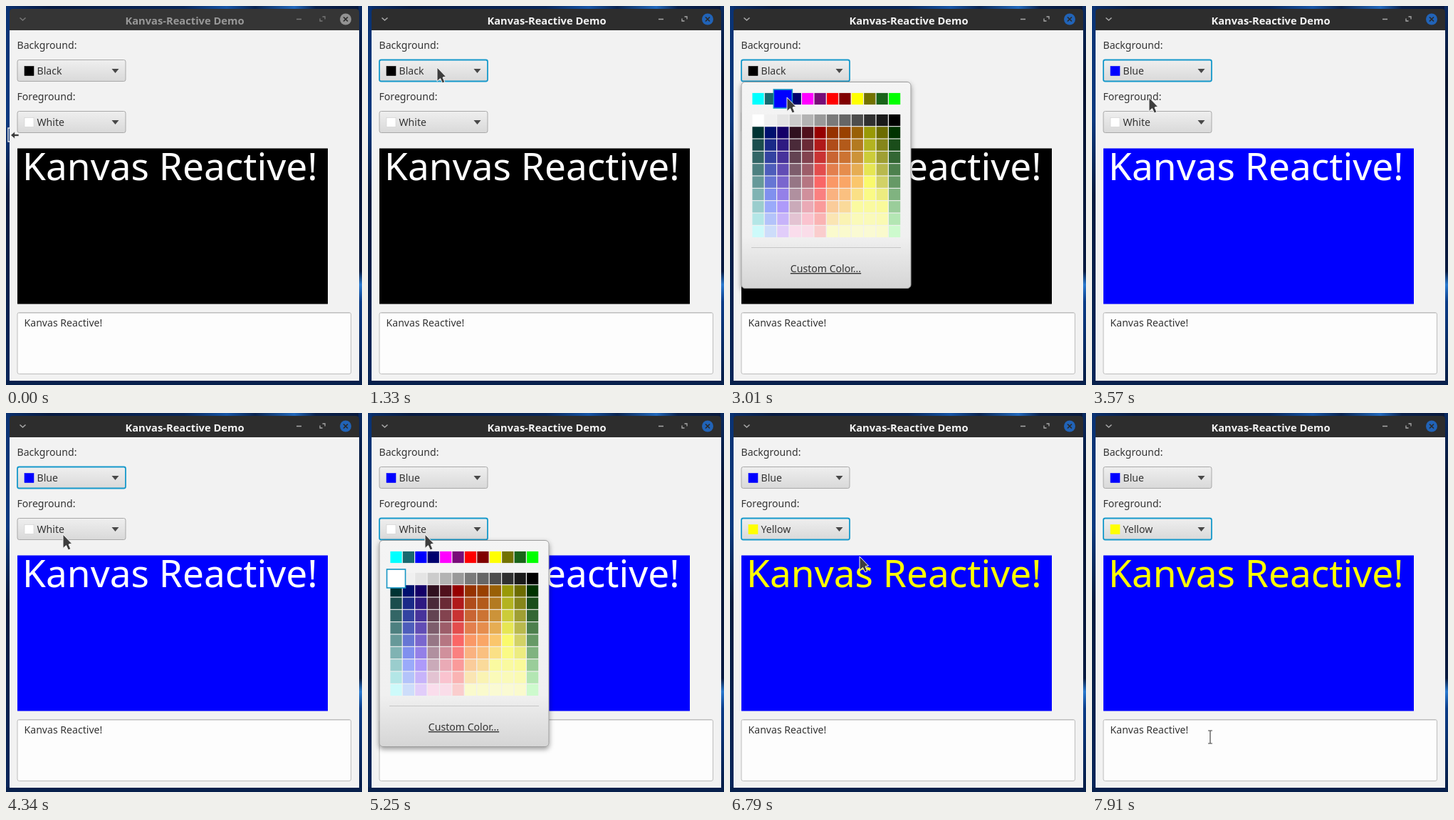
Recreate the animation shown at these times as an HTML page. Size 500x531 px, loop 8 s.

```html
<!DOCTYPE html>
<html lang="en">
<head>
<meta charset="utf-8">
<title>Kanvas-Reactive Demo</title>
<style>
  html, body { margin: 0; width: 100%; height: 100%; overflow: hidden; background: #081630; }
  svg { display: block; width: 500px; height: 531px; }
  text { font: 14.1px "Noto Sans", sans-serif; fill: #343434; white-space: pre; }
  #title { font-size: 14.7px; font-weight: 700; text-anchor: middle; }
  #banner { font-size: 53.2px; }
  .link { text-anchor: middle; text-decoration: underline; }
</style>
</head>
<body>
<svg id="stage" viewBox="0 0 500 531">
  <defs>
    <linearGradient id="sky">
      <stop offset="0" stop-color="#0a2f6c"/><stop offset=".12" stop-color="#071b42"/>
      <stop offset=".5" stop-color="#09275a"/><stop offset=".62" stop-color="#1554a6"/>
      <stop offset=".7" stop-color="#0a2450"/><stop offset=".81" stop-color="#2168bc"/>
      <stop offset=".87" stop-color="#0a214c"/><stop offset="1" stop-color="#08193c"/>
    </linearGradient>
    <linearGradient id="leftEdge" x2="0" y2="1">
      <stop offset="0" stop-color="#0a3272"/><stop offset=".3" stop-color="#0a3a80"/>
      <stop offset=".5" stop-color="#061a3e"/><stop offset="1" stop-color="#07265a"/>
    </linearGradient>
    <linearGradient id="rightEdge" x2="0" y2="1">
      <stop offset="0" stop-color="#0a2a60"/><stop offset=".2" stop-color="#071330"/>
      <stop offset=".7" stop-color="#081a40"/><stop offset=".735" stop-color="#2a7ad0"/>
      <stop offset=".78" stop-color="#0b3c88"/><stop offset="1" stop-color="#071c44"/>
    </linearGradient>
    <linearGradient id="button" x2="0" y2="1">
      <stop offset="0" stop-color="#efefef"/><stop offset="1" stop-color="#d9d9d9"/>
    </linearGradient>
    <linearGradient id="sheet" x2="0" y2="1">
      <stop offset="0" stop-color="#f4f4f4"/><stop offset=".75" stop-color="#f0f0f0"/>
      <stop offset="1" stop-color="#d5d5d5"/>
    </linearGradient>
    <filter id="shadow" x="-10%" y="-10%" width="120%" height="120%">
      <feDropShadow dx="0" dy="3" stdDeviation="3.5" flood-opacity=".4"/>
    </filter>
  </defs>

  <rect width="500" height="531" fill="url(#sky)"/>
  <rect width="5" height="531" fill="url(#leftEdge)"/>
  <rect x="495" width="5" height="531" fill="url(#rightEdge)"/>
  <rect y="524" width="500" height="7" fill="#07204c"/>

  <rect x="5" y="30" width="491" height="495" fill="#f2f2f2"/>
  <path id="bar" d="M5 34V9q0-5 5-5H491q5 0 5 5V34z"/>
  <text id="title" x="251" y="25.5">Kanvas-Reactive Demo</text>
  <g id="controls" fill="none" stroke-width="1.6">
    <path d="M19.5 16.5l4 3.5 4-3.5M408 18.5h7"/>
    <path d="M444.5 15h3.5v3.5M441 17.5V21h3.5" stroke-width="1.3"/>
  </g>
  <circle id="close" cx="477" cy="18.5" r="8"/>
  <path d="M474 15.500l6 6m0-6l-6 6" stroke="#2b2b2b" stroke-width="1.7"/>

  <text x="15.500" y="60">Background:</text>
  <text x="15.500" y="132">Foreground:</text>
  <g id="pickers"></g>

  <rect id="board" x="16" y="199.500" width="436" height="218"/>
  <text id="banner" x="23" y="244">Kanvas Reactive!</text>

  <rect x="16" y="429.500" width="468.500" height="86" rx="2.500" fill="#fdfdfd" stroke="#bdbdbd"/>
  <path d="M18 430.500H483" stroke="#dedede"/>
  <text x="25.500" y="449">Kanvas Reactive!</text>

  <g id="popup">
    <rect x="16" y=".5" width="238" height="289" rx="5" fill="url(#sheet)" stroke="#9d9d9d" filter="url(#shadow)"/>
    <g id="cells"></g>
    <path d="M30 232.500H240" stroke="#c6c6c6"/>
    <text class="link" x="134.500" y="267">Custom Color...</text>
    <rect id="focus" width="26" height="26" stroke="#1495c4" stroke-width="1.6"/>
  </g>

  <g id="resize" fill="#3c3c3c" stroke="#e8e8e8" stroke-width=".8">
    <path d="M6 171H3V190H6" fill="none" stroke-width="1.5"/>
    <path d="M6.500 181l6-5v3.500H18v3h-5.500V186z"/>
  </g>
  <path id="arrow" d="M0 0V19.500L4.500 15.500 7.500 22 10.800 20.400 8 14 12.500 13z" fill="#3d3d3d" stroke="#f3f3f3" stroke-width="1"/>
  <g id="beam" fill="none">
    <path d="M-3-9H3M0-9V9M-3 9H3" stroke="#fff" stroke-width="3"/>
    <path d="M-3-9H3M0-9V9M-3 9H3" stroke="#444" stroke-width="1.2"/>
  </g>
</svg>
<script>
const DURATION = 8000, STEP = 70;
const $ = id => document.getElementById(id);
const set = (el, attrs) => { for (const k in attrs) el.setAttribute(k, attrs[k]); };
const show = (el, on) => el.setAttribute('visibility', on ? 'visible' : 'hidden');

// Pointer tip: time, x, y
const pointer = [
  [0, 8, 181], [840, 97, 86], [1820, 97, 86], [2310, 99, 133], [2380, 99, 133],
  [2660, 91, 131], [2730, 91, 131], [3010, 80, 128], [3920, 80, 128],
  [4340, 80, 170], [5390, 80, 170], [6230, 182, 201], [7140, 182, 201], [7910, 166, 454]
];

function pointerAt(t) {
  const i = pointer.findIndex(p => p[0] > t);
  if (i < 0) return pointer.at(-1).slice(1);
  const [t0, x0, y0] = pointer[i - 1], [t1, x1, y1] = pointer[i];
  const u = (t - t0) / (t1 - t0), e = u * u * (3 - 2 * u);
  return [x0 + (x1 - x0) * e, y0 + (y1 - y0) * e];
}

// Palette: a row of pure colours, a row of greys, nine rows of growing lightness
const pure = ['#0ff', '#18696f', '#00f', '#00006e', '#f0f', '#780c78',
              '#f00', '#800000', '#ff0', '#737300', '#196419', '#0f0'];
const greys = [255, 240, 228, 204, 179, 153, 122, 102, 77, 48, 26, 0];
const darkest = ['003333', '00106e', '140068', '30101f', '50101c', '960000',
                 '963200', '994000', '996006', '999906', '6c6c00', '003300'];
const lighten = (hex, row) =>
  `rgb(${hex.match(/../g).map(h => Math.min(250, parseInt(h, 16) + 25.6 * row))})`;

const cells = [];
for (let row = -1; row < 10; row++)
  for (let col = 0; col < 12; col++)
    cells.push({
      x: 39.5 + 17.42 * col,
      y: row < 0 ? 24 : 54 + 17.33 * row,
      color: row < 0 ? pure[col] : row ? lighten(darkest[col], row - 1)
        : `rgb(${[0, 0, 0].fill(greys[col])})`
    });
$('cells').innerHTML = cells.map(c =>
  `<rect x="${c.x - 8.1}" y="${c.y - 8.1}" width="16.2" height="16.2" fill="${c.color}"/>`).join('');
const WHITE = cells[12], BLACK = cells[23];

const pickers = [75, 147].map(y => {
  const g = document.createElementNS('http://www.w3.org/2000/svg', 'g');
  g.innerHTML = `<rect x="16" y="${y + .5}" width="152" height="30" rx="2.5" fill="url(#button)"/>
    <rect x="26" y="${y + 9.5}" width="13" height="13"/>
    <text x="43.5" y="${y + 21}"></text>
    <path d="M148.500 ${y + 13}h10l-5 6z" fill="#484848"/>`;
  $('pickers').append(g);
  return g.children;
});

function drawPicker([frame, swatch, label], name, color, focused) {
  set(frame, { stroke: focused ? '#1699cb' : '#a9a9a9', 'stroke-width': focused ? 1.8 : 1 });
  set(swatch, { fill: color, stroke: color === '#fff' ? '#cfcfcf' : color, 'stroke-width': .6 });
  label.textContent = name;
}

function drawPopup(top, selected, x, y) {
  set($('popup'), { transform: `translate(0 ${top})` });
  const hit = cells.find(c => Math.abs(x - c.x) < 8.72 && Math.abs(y - top - c.y) < 8.7);
  const { x: cx, y: cy, color } = hit || selected;
  set($('focus'), { x: cx - 13, y: cy - 13, fill: color });
}

function render(t) {
  const active = t >= 1330, blue = t >= 3570, yellow = t >= 6790;
  const first = t >= 1820 && !blue, second = t >= 5180 && !yellow;
  const [x, y] = pointerAt(t);
  const ink = yellow ? '#ff0' : '#fff';

  set($('bar'), { fill: active ? '#2d2d2d' : '#353535' });
  $('title').style.fill = active ? '#f4f4f4' : '#989898';
  set($('controls'), { stroke: active ? '#a8a8a8' : '#777' });
  set($('close'), { fill: active ? '#2163b7' : '#929292' });

  drawPicker(pickers[0], blue ? 'Blue' : 'Black', blue ? '#00f' : '#000', active && t < 5180);
  drawPicker(pickers[1], yellow ? 'Yellow' : 'White', ink, t >= 5180);
  set($('board'), { fill: blue ? '#00f' : '#000' });
  $('banner').style.fill = ink;

  show($('popup'), first || second);
  if (first) drawPopup(106, BLACK, x, y);
  if (second) drawPopup(178, WHITE, x, y);

  const onEdge = t < STEP, onText = y > 430;
  show($('resize'), onEdge);
  show($('arrow'), !onEdge && !onText);
  show($('beam'), onText);
  for (const id of ['arrow', 'beam']) set($(id), { transform: `translate(${x} ${y})` });
}

function tick() {
  const t = performance.now() % DURATION;
  render(Math.floor(t / STEP) * STEP);
  requestAnimationFrame(tick);
}
tick();
</script>
</body>
</html>
```
